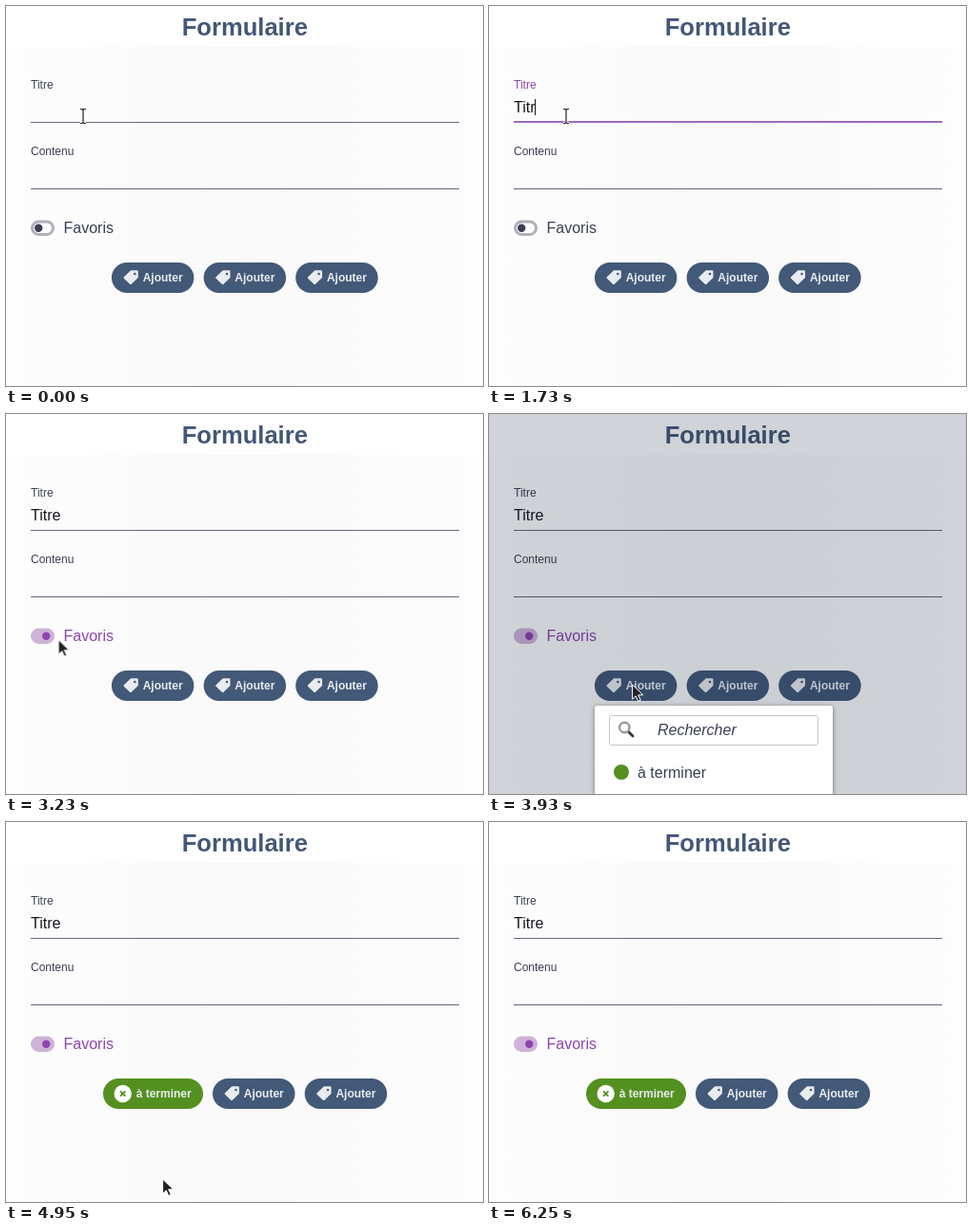
An HTML page for the animation above (6.66 s loop, 501 by 400 pixels).

```html
<!DOCTYPE html>
<html lang="fr">
<head>
<meta charset="utf-8">
<title>Formulaire</title>
<style>
  html, body { margin: 0; width: 100%; height: 100%; overflow: hidden; background: #fff; }
  svg { display: block; }
  text { font: 16px "Liberation Sans", Arial, sans-serif; fill: #3b3f54; white-space: pre; }
  .title { font-size: 25.6px; font-weight: bold; fill: #435877; text-anchor: middle; }
  .label { font-size: 12px; }
  .value { fill: #17181f; }
  .pill { fill: #435978; }
  .pill-text { font-size: 12px; font-weight: bold; fill: #e9ecef; }
  .search { font-style: italic; }
  .line { fill: #62657a; }
  .green { fill: #549020; }

  /* One shared 6660 ms timeline: 1% = 66.6 ms */
  .anim { animation: 6660ms linear infinite both; }
  .step { animation-timing-function: step-end; }

  .focus-label { animation-name: focus-label; }
  .focus-line { animation-name: focus-line; }
  @keyframes focus-label {
    0%, 6% { fill: #3b3f54; }
    8.2%, 43.9% { fill: #8e44ad; }
    46.2%, 100% { fill: #3b3f54; }
  }
  @keyframes focus-line {
    0%, 6% { opacity: 0; }
    8.2%, 43.9% { opacity: 1; }
    46.2%, 100% { opacity: 0; }
  }

  .typed { animation-name: typed; }
  @keyframes typed {
    0% { width: 0; }
    17.2% { width: 10px; }
    20.2% { width: 12.7px; }
    22.5% { width: 17.3px; }
    25.9% { width: 22.8px; }
    28.2%, 100% { width: 34px; }
  }
  .caret { animation-name: caret-move, caret-blink; }
  @keyframes caret-move {
    0% { transform: translateX(0); }
    17.2% { transform: translateX(9px); }
    20.2% { transform: translateX(12px); }
    22.5% { transform: translateX(17px); }
    25.9% { transform: translateX(22px); }
    28.2%, 100% { transform: translateX(31px); }
  }
  @keyframes caret-blink {
    0%, 15%, 35.7%, 43.9%, 100% { opacity: 0; }
    6%, 17.2%, 43.2% { opacity: 1; }
  }

  .track { animation-name: track; }
  .knob { animation-name: knob; }
  .favorite { animation-name: favorite; }
  @keyframes track {
    0%, 43.9% { fill: #fcfcfd; stroke: #aeb0ba; }
    46.5%, 100% { fill: #ceb2da; stroke: #ceb2da; }
  }
  @keyframes knob {
    0%, 43.9% { fill: #3b3f54; transform: translateX(0); }
    46.5%, 100% { fill: #8e44ad; transform: translateX(8px); }
  }
  @keyframes favorite {
    0%, 43.9% { fill: #3b3f54; }
    46.5%, 100% { fill: #8e44ad; }
  }

  .before { animation-name: before; }
  .after { animation-name: after; }
  @keyframes before { 0% { opacity: 1; } 74.2%, 100% { opacity: 0; } }
  @keyframes after { 0% { opacity: 0; } 74.2%, 100% { opacity: 1; } }

  .backdrop { animation-name: backdrop; }
  .menu { animation-name: menu; filter: drop-shadow(0 1px 2.5px rgba(0, 0, 0, .45)); }
  .hover { animation-name: hover; }
  @keyframes backdrop {
    0%, 54.5% { opacity: 0; }
    60.5%, 74.2% { opacity: 1; }
    74.21%, 100% { opacity: 0; }
  }
  @keyframes menu {
    0%, 54.5% { opacity: 0; }
    56.7%, 74.2% { opacity: 1; }
    74.21%, 100% { opacity: 0; }
  }
  @keyframes hover {
    0%, 74.2%, 100% { opacity: 0; }
    69.5% { opacity: 1; }
  }

  .cursor { animation-name: cursor; }
  @keyframes cursor {
    0%, 32.2% { transform: translate(81px, 116px); animation-timing-function: ease-in; }
    36.5% { transform: translate(97px, 172px); animation-timing-function: ease-out; }
    41.2%, 45.5% { transform: translate(36px, 228px); animation-timing-function: ease-in; }
    48.4% { transform: translate(51px, 235px); animation-timing-function: ease-out; }
    53.7%, 63% { transform: translate(150px, 284px); animation-timing-function: ease-in-out; }
    71%, 83% { transform: translate(164px, 375px); }
    92.3%, 100% { transform: translate(56px, 20px); }
  }
  .beam { animation-name: beam; }
  .arrow { animation-name: arrow; }
  .hand { animation-name: hand; }
  @keyframes beam {
    0%, 35%, 37.7%, 87.8%, 89.6% { opacity: 1; }
    33.4%, 36.8%, 38.2%, 89.1%, 90.7%, 100% { opacity: 0; }
    35% { opacity: 1; }
    37.7% { opacity: 0; }
  }
  @keyframes arrow {
    0%, 35%, 40.2%, 52.5%, 69.5%, 85%, 87.8%, 89.6%, 93.8%, 100% { opacity: 0; }
    33.4%, 36.8%, 48.3%, 54.5%, 74.2%, 85.9%, 89.1%, 90.7% { opacity: 1; }
  }
  @keyframes hand {
    0%, 48.3%, 54.5%, 74.2%, 85.9%, 100% { opacity: 0; }
    40.2%, 52.5%, 69.5%, 85% { opacity: 1; }
  }
</style>
</head>
<body>
<svg width="501" height="400" viewBox="0 0 501 400">
  <defs>
    <linearGradient id="page">
      <stop offset="0" stop-color="#fdfdfd"/>
      <stop offset=".5" stop-color="#f9f9f9"/>
      <stop offset="1" stop-color="#fdfdfd"/>
    </linearGradient>
    <clipPath id="typed"><rect class="anim step typed" x="26" y="96" width="0" height="22"/></clipPath>
    <g id="add">
      <rect class="pill" y="270" width="86.5" height="32" rx="16"/>
      <path d="M20.5 279.5 H26.7 V285.5 L20 292 L13.8 286 Z" fill="#e9ecef" stroke="#e9ecef" stroke-width="2.4" stroke-linejoin="round"/>
      <circle class="pill" cx="24.4" cy="282" r="1.3"/>
      <text class="pill-text" x="32.75" y="290">Ajouter</text>
    </g>
  </defs>

  <rect width="501" height="400" fill="#fff"/>
  <rect y="43" width="501" height="357" fill="url(#page)"/>
  <text class="title" x="250.8" y="31">Formulaire</text>

  <text class="label anim focus-label" x="26" y="87">Titre</text>
  <text class="value" x="26" y="112" clip-path="url(#typed)">Titre</text>
  <rect class="anim step caret" x="26" y="98" width="1" height="17" fill="#17181f"/>
  <rect class="line" x="26" y="122" width="450" height="1"/>
  <rect class="anim focus-line" x="26" y="121" width="450" height="2" fill="#a169b8"/>

  <text class="label" x="26" y="157">Contenu</text>
  <rect class="line" x="26" y="192" width="450" height="1"/>

  <rect class="anim track" x="27.5" y="227" width="22" height="13.5" rx="6.75" stroke-width="3"/>
  <circle class="anim knob" cx="34.2" cy="233.8" r="4.2"/>
  <text class="anim favorite" x="60.5" y="239">Favoris</text>

  <g class="anim step before">
    <use href="#add" x="110.9"/>
    <use href="#add" x="207.6"/>
    <use href="#add" x="304.2"/>
  </g>
  <g class="anim step after">
    <rect class="green" x="102" y="270" width="105" height="32" rx="16"/>
    <circle cx="122.7" cy="286" r="9.2" fill="#fff"/>
    <path d="M120 283.3 l5.4 5.4 m0 -5.4 l-5.4 5.4" stroke="#549020" stroke-width="1.9"/>
    <text class="pill-text" x="136.7" y="290">à terminer</text>
    <use href="#add" x="217"/>
    <use href="#add" x="313.7"/>
  </g>

  <rect class="anim backdrop" width="501" height="400" fill="#08162d" fill-opacity=".25"/>
  <g class="anim menu">
    <rect x="111" y="307" width="250" height="110" rx="3" fill="#fff"/>
    <rect x="126.5" y="317.5" width="219" height="31" rx="2.5" fill="#fff" stroke="#c3c5ca"/>
    <path d="M146.5 334.5 l4.5 4.5" stroke="#333" stroke-width="2.8" stroke-linecap="round"/>
    <circle cx="142.3" cy="330" r="5.2" fill="#fff" stroke="#999" stroke-width="2.4"/>
    <text class="search" x="177" y="338">Rechercher</text>
    <rect class="anim step hover" x="111" y="359" width="250" height="38" fill="#e9ecef"/>
    <circle class="green" cx="139" cy="377" r="8"/>
    <text x="156" y="383">à terminer</text>
  </g>

  <g class="anim cursor">
    <g class="anim step beam" fill="none">
      <path d="M-3 -7.5 H-1 L0 -6.5 L1 -7.5 H3 M0 -6.5 V6.5 M-3 7.5 H-1 L0 6.5 L1 7.5 H3" stroke="#fff" stroke-width="3"/>
      <path d="M-3 -7.5 H-1 L0 -6.5 L1 -7.5 H3 M0 -6.5 V6.5 M-3 7.5 H-1 L0 6.5 L1 7.5 H3" stroke="#222" stroke-width="1.2"/>
    </g>
    <path class="anim step arrow" d="M.6 1 V16.2 L4.2 12.8 L6.8 18.4 L9.3 17.2 L6.7 11.8 H11.8 Z" fill="#222" stroke="#fff"/>
    <path class="anim step hand" d="M1 8.5 V.2 Q1 -1.2 2.3 -1.2 T3.6 .2 V5 Q5.8 3.6 6.6 5.4 Q8.6 4.4 9.2 6.4 Q11.4 5.8 11.4 8 V11 Q11.4 13 9.6 14.6 V16 H2.4 V14.6 Q0 12.5 -3 9 Q-3.8 7.2 -2 7.2 Z" fill="#fff" stroke="#222" stroke-width="1.2" stroke-linejoin="round"/>
  </g>
</svg>
</body>
</html>
```
